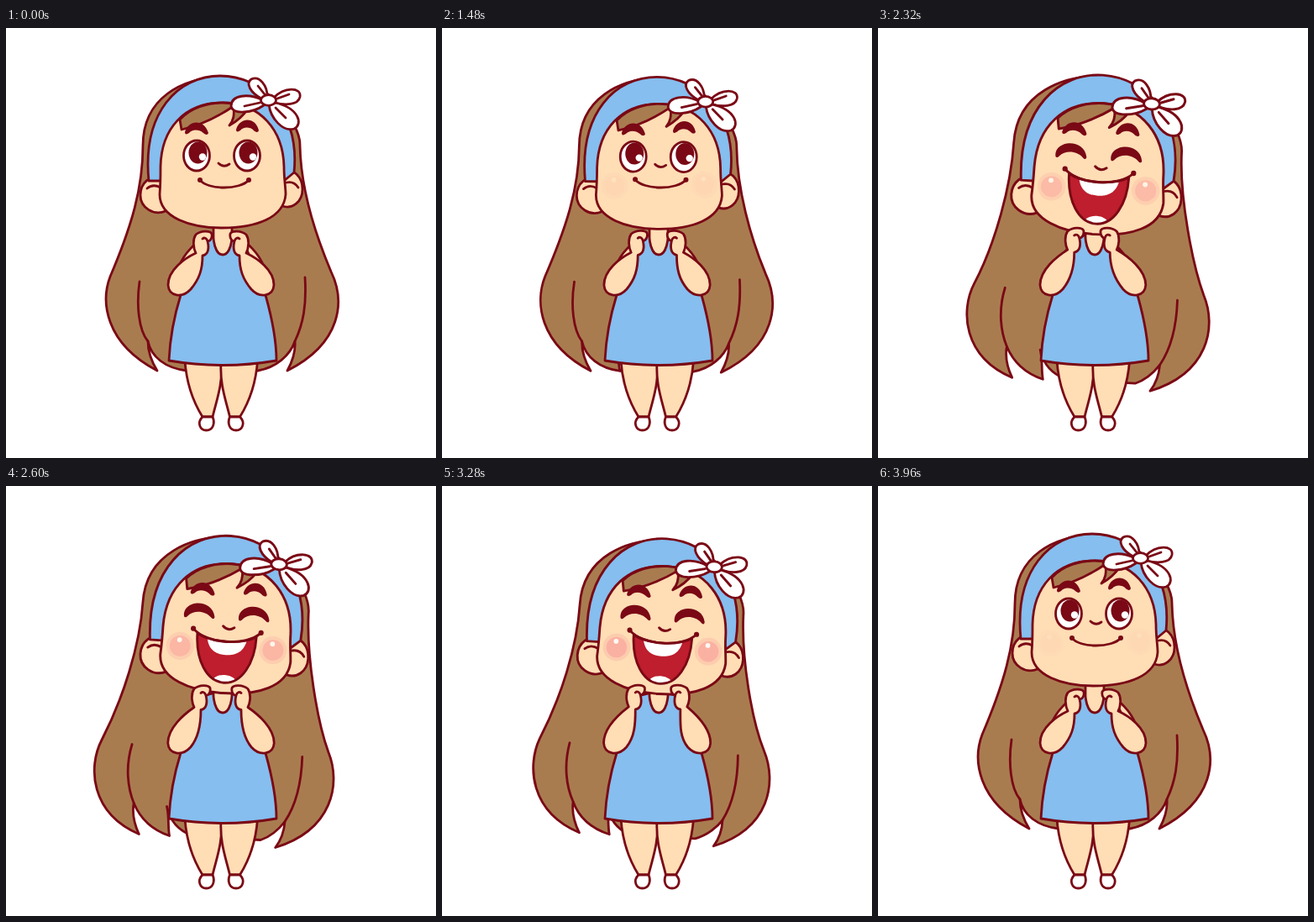
An HTML page for the animation above (4400 ms loop, 512 by 512 pixels).

```html
<!DOCTYPE html>
<html lang="en">
<head>
<meta charset="utf-8">
<title>Laughing girl</title>
<style>
  html, body { margin: 0; width: 100%; height: 100%; overflow: hidden; background: #fff; }
  svg { display: block; width: 100%; height: 100%; }
  .line { fill: none; }
  .skin { fill: #ffddb5; }
  .hair { fill: #a97c50; }
  .blue { fill: #85beef; }
  .white { fill: #fff; }
  .dark { fill: #7a0815; stroke: none; }
  .plain { stroke: none; }
</style>
</head>
<body>
<svg viewBox="0 0 512 512" stroke="#7a0815" stroke-width="2.8" stroke-linecap="round" stroke-linejoin="round">
  <defs>
    <clipPath id="mouthClip"><path id="mouthClipPath"/></clipPath>
    <g id="leg">
      <path class="skin" d="M213 396C215 425 224 447 234 463H246C251 442 258 425 256.5 398Z"/>
      <path class="white" d="M234 463C227 470 231 479 238.5 479C247 479 249 470 246 463Z"/>
    </g>
    <path id="upperArm" class="skin" d="M238 248C226 255 212 268 206 284L222 290C226 275 232 262 240 254Z"/>
    <g id="blush" class="plain">
      <circle r="16" fill="#fcc9ad"/>
      <circle r="12" fill="#fbaa9f"/>
      <circle cx="-1" cy="-7" r="2.8" fill="#fff"/>
    </g>
    <path id="lid" class="dark" d="M-17 7C-21 -12 14 -17 18 5C18 8 16 8 14 6C6 -2 -7 -1 -13 6C-15 8 -16 8 -17 7Z"/>
    <g id="eye">
      <ellipse class="white" rx="15.5" ry="18"/>
      <ellipse class="dark" cx="1.5" cy="-3.5" rx="11" ry="13"/>
      <circle class="white plain" cx="7" cy="1.5" r="4.2"/>
    </g>
  </defs>

  <path id="hair" class="hair"/>
  <path id="strands" class="line"/>

  <use href="#leg"/>
  <use href="#leg" transform="matrix(-1 0 0 1 512.5 0)"/>
  <use id="upperL" href="#upperArm"/>
  <use id="upperR" href="#upperArm"/>
  <path class="blue" d="M234 250C223 275 214 298 208 318C198 350 195 375 194 396Q258 407 322 396C322 375 318 350 309 318C303 298 292 275 280 250L269 247H246Z"/>
  <path class="skin" d="M247 234V250C248 262 252 270 258 270C264 270 268 262 269 250V234Z"/>

  <g id="head">
    <path class="skin" d="M188 180C171 172 160 186 160 199C160 214 176 224 190 218"/>
    <path class="line" d="M168 191Q175 185 184 190"/>
    <path class="skin" d="M330 172C343 166 353 178 353 192C353 207 341 216 329 212"/>
    <path class="line" d="M348 190Q343 182 334 184"/>
    <path class="blue" d="M170 182C162 100 205 57 255 57C305 57 350 100 343 172L331 182H184Z"/>
    <path class="skin" d="M184 165C185 120 212 89 258 89C303 89 330 122 331 165C331 180 333 190 333 198C331 226 298 238 257 238C220 238 183 226 183 198C184 185 184 175 184 165Z"/>
    <path class="hair" d="M207 109C220 95 240 89 258 89Q275 89 288 96C283 104 275 111 266 116C271 110 272 104 271 93C252 106 231 116 209 121Z"/>

    <g class="white">
      <path d="M306 86C288 77 268 80 268 93C270 104 294 101 307 92Z"/>
      <path d="M311 81C311 69 302 56 292 61C285 66 291 77 304 84Z"/>
      <path d="M319 83C331 70 352 70 350 82C348 92 332 92 320 89Z"/>
      <path d="M313 91C315 108 330 124 343 120C354 115 349 95 320 89Z"/>
      <path class="line" d="M284 93L302 89M300 69L308 79M323 84L337 79M321 95L333 107"/>
      <ellipse cx="312.5" cy="86" rx="9" ry="6.3"/>
    </g>

    <path class="dark" d="M213 124C217 109 236 108 241 125C240 128 237 127 235 125C229 120 221 121 218 125C215 127 213 127 213 124ZM274 121C278 106 297 105 301 122C300 125 297 124 295 122C290 117 282 118 279 122C276 124 274 124 274 121Z"/>
    <g id="openEyes"><use href="#eye" x="227" y="152"/><use href="#eye" x="287" y="152"/></g>
    <g id="closedEyes"><use href="#lid" x="224.5" y="146"/><use href="#lid" x="287.5" y="146"/></g>
    <path class="line" d="M253 161Q259 167 266 162"/>
    <g id="cheeks"><use href="#blush" x="205" y="187"/><use href="#blush" x="312" y="185"/></g>

    <g id="mouth">
      <g clip-path="url(#mouthClip)" class="plain">
        <rect x="210" y="160" width="100" height="75" fill="#be1e2d"/>
        <path class="white" d="M235 170H282C281 189 270 194 258 194C246 194 236 189 235 170Z"/>
        <ellipse id="tongue" class="white" cx="258.5" rx="14" ry="9"/>
      </g>
      <path id="mouthEdge" class="line"/>
    </g>
    <path id="lip" class="line"/>
    <circle id="cornerL" class="dark" r="3"/>
    <circle id="cornerR" class="dark" r="3"/>
  </g>

  <path id="armL" class="skin"/>
  <path id="armR" class="skin" transform="matrix(-1 0 0 1 512 0)"/>
</svg>

<script>
const LOOP = 4400, STEP = 40, SWING = 640;
const $ = id => document.getElementById(id);
const set = (id, name, value) => $(id).setAttribute(name, value);
const show = (id, visible) => set(id, 'visibility', visible ? 'visible' : 'hidden');
const mix = (a, b, k) => a + (b - a) * k;
const progress = (t, from, to) => Math.min(1, Math.max(0, (t - from) / (to - from)));
const easeOut = p => Math.sin(p * Math.PI / 2);
const easeInOut = p => (1 - Math.cos(p * Math.PI)) / 2;
const hump = p => Math.sin(p * Math.PI) ** 2;

// Blend two paths of equal structure; place() maps each blended point.
function morph(a, b, kx, ky = kx, place = (x, y) => [x, y]) {
  const target = b.match(/[\d.]+/g).map(Number);
  let i = 0;
  return a.replace(/([\d.]+) ([\d.]+)/g, (_, x, y) =>
    place(mix(+x, target[i++], kx), mix(+y, target[i++], ky)).map(v => v.toFixed(2)).join(' '));
}

const hairRest = '150 235 124 296C113 325 117 375 180 408C172 395 169 385 169 373' +
  'C173 392 190 405 215 408C213 402 213 395 213 385C215 395 220 400 228 404' +
  'L300 408C322 404 338 390 344 373C345 385 341 397 335 408C400 375 404 325 387 290C368 245';
const hairLow = '136 250 112 298C96 330 99 385 155 410C149 397 147 385 149 373' +
  'C157 393 170 405 190 412C188 400 190 390 187 377C191 395 200 405 216 412' +
  'L295 417C307 413 317 403 323 395C322 408 318 418 312 426C378 405 388 350 373 312C360 275';
const strandsRest = 'M159 302C155 330 158 360 169 373M356 297C358 330 354 352 344 373';
const strandsLow = 'M147 303C139 330 142 355 149 373M343 318C342 350 336 375 323 395';

const lipSmile = 'M231 181C240 193 279 193 289 181';
const lipLaugh = 'M219 166C235 183 281 183 297 166';
const mouthSmile = 'M231 181C240 193 279 193 289 181C285 187 275 190 260 190C245 190 235 187 231 181Z';
const mouthLaugh = 'M224 171C240 181 276 181 292 171C292 202 278 226 258 226C238 226 224 202 224 171Z';

// Left arm with its fist moved by (hx, hy); the elbow hardly follows.
function armPath(hx, hy) {
  const hand = (x, y) => `${x + hx} ${y + hy}`;
  const elbow = (x, y) => `${x + hx * 0.12} ${y}`;
  return `M${hand(226, 268)}C${213 + hx / 2} ${274 + hy / 2} ${elbow(193, 288)} ${elbow(193, 306)}` +
    `C${elbow(194, 320)} ${elbow(210, 322)} ${elbow(220, 311)}C${elbow(230, 299)} ${hand(234, 288)} ${hand(234, 271)}` +
    `C${hand(241, 270)} ${hand(242, 262)} ${hand(240, 254)}C${hand(243, 254)} ${hand(246, 250)} ${hand(245, 245)}` +
    `C${hand(243, 241)} ${hand(232, 241)} ${hand(226, 246)}C${hand(222, 252)} ${hand(223, 262)} ${hand(226, 268)}Z` +
    `M${hand(240, 254)}C${hand(239, 250)} ${hand(236, 249)} ${hand(234, 251)}`;
}

function draw(t) {
  const bobPhase = progress(t, 200, 840);
  const bob = hump(bobPhase);
  const hairBob = 13.5 * hump(bobPhase ** 1.35);
  const start = easeOut(progress(t, 1440, 1960));
  const laugh = start * (1 - easeInOut(progress(t, 3400, 3900)));
  const hairSide = start * (1 - easeOut(progress(t, 3160, 3900)));
  const lift = t > 2120 && t < 3400 ? hump((t - 2120) / SWING) : 0;

  // The head turns and grows around the chin.
  const angle = 0.065 * laugh, scale = 1 + 0.07 * lift;
  const c = scale * Math.cos(angle), s = scale * Math.sin(angle);
  const dx = 256 + 0.5 * laugh, dy = 238 + 11 * laugh + 8.8 * bob - 5 * lift;
  const head = (x, y) => [dx + c * (x - 256) - s * (y - 238), dy + s * (x - 256) + c * (y - 238)];
  const at = (x, y) => head(x, y).map(v => v.toFixed(2)).join(' ');
  const [ox, oy] = head(0, 0);
  set('head', 'transform', `matrix(${c} ${s} ${-s} ${c} ${ox} ${oy})`);

  const sway = (x, y) => [x + lift * (3 + 19 * (x - 100) / 280), y + 9 * lift + hairBob];
  const ends = morph(hairRest, hairLow, hairSide, laugh, sway);
  const left = 163 - 4 * laugh;
  set('hair', 'd', `M${at(258, 58)}C${at(210, 59)} ${at(left, 83)} ${at(left, 140)}C${at(left, 190)} ` +
    `${ends} ${at(351, 190)} ${at(350, 140)}C${at(351, 112)} ${at(308, 60)} ${at(258, 58)}Z`);
  set('strands', 'd', morph(strandsRest, strandsLow, hairSide, laugh, sway));

  const handY = 6.5 * bob - 6 * laugh + 3 * lift;
  set('armL', 'd', armPath(9 * bob - 6.5 * laugh + 9 * lift, handY));
  set('armR', 'd', armPath(9 * bob - 12 * laugh + 20 * lift, handY));
  set('upperL', 'transform', `translate(${6 * laugh})`);
  set('upperR', 'transform', `matrix(-1 0 0 1 ${513 - 6 * laugh} 0)`);

  const closed = laugh > 0.5;
  show('openEyes', !closed);
  show('closedEyes', closed);
  set('cheeks', 'opacity', Math.max(laugh * (1 - 0.5 * lift), t >= 3400 ? 0.08 : 0));

  const mouth = morph(mouthSmile, mouthLaugh, laugh);
  set('mouthEdge', 'd', mouth);
  set('mouthClipPath', 'd', mouth);
  set('tongue', 'cy', mix(200, 226, laugh));
  show('mouth', laugh > 0.15);
  set('lip', 'd', morph(lipSmile, lipLaugh, laugh));
  set('cornerL', 'cx', mix(231, 219, laugh));
  set('cornerR', 'cx', mix(289, 297, laugh));
  for (const id of ['cornerL', 'cornerR']) set(id, 'cy', mix(181, 166, laugh));
}

const begin = performance.now();
function tick() {
  const t = (performance.now() - begin) % LOOP;
  draw(Math.floor(t / STEP) * STEP);
  requestAnimationFrame(tick);
}
tick();
</script>
</body>
</html>
```
